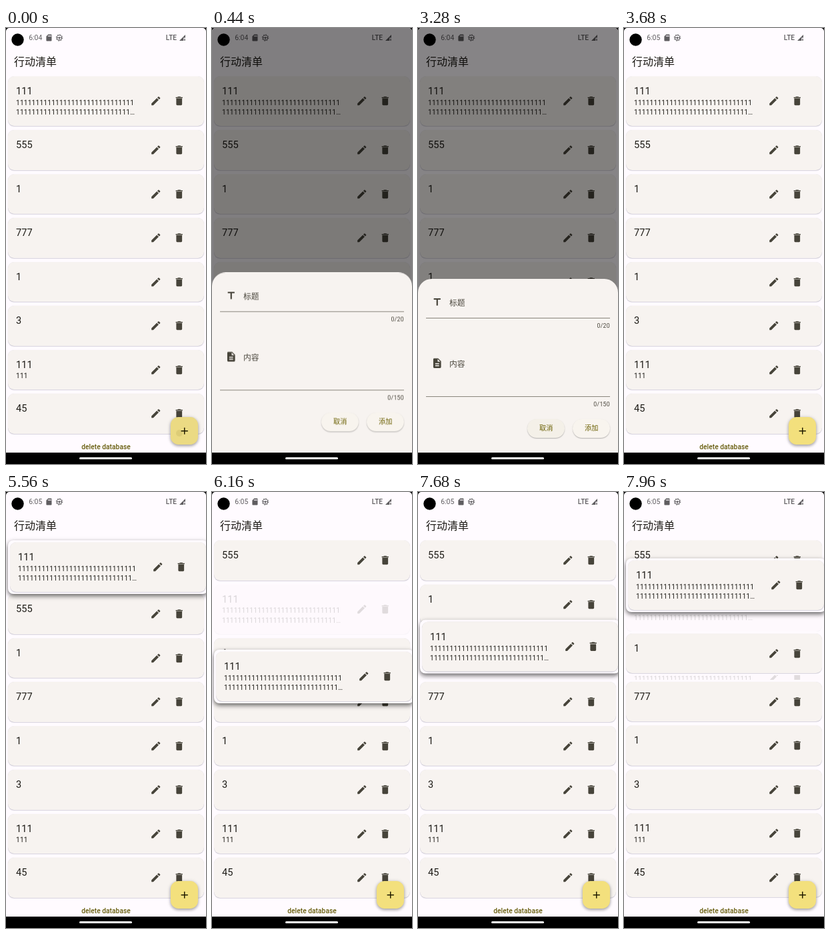
These frames come from a looping animation (300 by 650 pixels, 8 s). An HTML page:

```html
<!DOCTYPE html>
<html lang="zh-CN">
<head>
<meta charset="utf-8">
<title>Action list</title>
<style>
  html, body { margin: 0; width: 100%; height: 100%; overflow: hidden; background: #000; }
  #stage { position: absolute; left: 0; top: 0; width: 300px; height: 650px; overflow: hidden; background: #000;
    font-family: Roboto, "Noto Sans CJK SC", "Noto Sans CJK", sans-serif; color: #1d1b16; }
  #app { position: absolute; left: 0; top: 0; width: 300px; height: 633px; overflow: hidden; background: #fffbff;
    border-radius: 5px 5px 0 0; }
  #app *, #pill { position: absolute; box-sizing: border-box; white-space: nowrap; }
  svg { overflow: visible; }
  #status { left: 0; top: 0; width: 300px; height: 30px; }
  #status text { font-size: 10.4px; fill: #5f5d60; }
  h1 { margin: 0; left: 12px; top: 37px; font: 400 16px/24px "Noto Sans CJK SC", "Noto Sans CJK", sans-serif; }

  /* list */
  #app #list { left: 0; top: 69px; width: 300px; }
  #app .row, #app .gap { position: relative; width: 300px; }
  .row { height: 65.5px; flex: none; }
  .row.tall { height: 80px; }
  .gap { height: 0; overflow: hidden; display: flex; flex-direction: column; justify-content: center; }
  .card { left: 3px; right: 2.7px; top: 3px; bottom: 3px; border-radius: 9px; background: #f7f3f0;
    box-shadow: 0 .8px 1px rgba(40,40,80,.24), 0 0 1px rgba(0,0,0,.1); }
  .name { left: 12px; top: 12px; font-size: 14.6px; line-height: 20px; }
  .note { left: 12px; top: 32.7px; font-size: 10.2px; line-height: 14.6px; letter-spacing: .18px; }
  .icon { width: 17.5px; height: 17.5px; fill: #47443a; }
  .card .icon { top: calc(50% - 8.75px); }
  .edit { left: 212.6px; }
  .bin { left: 247.6px; }
  #app #drag { position: absolute; left: 0; top: 69px; border-radius: 8px; background: #fffbff; opacity: 0;
    box-shadow: 0 3px 7px rgba(0,0,0,.6); }

  #footer { left: 0; width: 300px; top: 617.3px; text-align: center; font: 500 10.2px/16px Roboto, sans-serif;
    letter-spacing: .05px; color: #665c0b; }
  #fab { left: 247.2px; top: 580px; width: 41px; height: 41px; border-radius: 11.7px; background: #f3e07d;
    box-shadow: 0 2px 4px rgba(0,0,0,.3), 0 1px 6px rgba(0,0,0,.14); }
  #fab .clip { inset: 0; border-radius: inherit; overflow: hidden; background: rgba(190,185,165,.16); }
  .ripple { width: 80px; height: 80px; margin: -40px; border-radius: 50%; background: rgba(100,90,10,.1); }
  #fab .ripple { left: 13px; top: 24px; }
  #fab .icon { left: 11.75px; top: 11.75px; fill: #211c00; }

  /* bottom sheet */
  #scrim { inset: 0; background: #000; opacity: 0; }
  #sheet { left: 0; top: 345px; width: 300px; height: 288px; border-radius: 20.4px 20.4px 0 0; background: #f7f3f0;
    transform: translateY(100%); }
  #sheet .icon { left: 20.3px; }
  .label { left: 47px; font-size: 11.8px; line-height: 18px; color: #4a463c; }
  .line { left: 12px; width: 276px; height: 1px; background: #8a867d; }
  .count { right: 12px; font-size: 8.76px; line-height: 12px; letter-spacing: .28px; color: #4a463c; }
  .button { top: 208.5px; width: 56px; height: 28.5px; border-radius: 15px; overflow: hidden; background: #f8f4ee;
    box-shadow: 0 1px 1.5px rgba(0,0,0,.27); text-align: center; font-size: 10.2px; line-height: 28.5px; color: #6a5f00; }
  #pill { left: 110px; top: 639.5px; width: 79px; height: 3px; border-radius: 2px; background: #fff; }

  /* one 8 s loop: 1% = 80 ms */
  #fab .clip, .ripple, #scrim, #sheet, .gap, #drag, .clock { animation: 8s linear infinite; }
  #fab .clip { animation-name: press; }
  #fab .ripple { animation-name: tap; }
  #cancel .ripple { left: 28px; top: 15px; animation-name: cancel; }
  #scrim { animation-name: dim; }
  #sheet { animation-name: slide; }
  #before { animation-name: before; }
  #after { animation-name: after; }
  #gap0 { animation-name: gap0; }
  #gap1 { animation-name: gap1; }
  #gap2 { animation-name: gap2; }
  #gap3 { animation-name: gap3; }
  .gap .row { opacity: .17; }
  #gap0 .row { animation: held 8s linear infinite; }
  #drag { animation-name: drag, lift; }

  @keyframes press { 0%, 2% { opacity: 1; } 5%, 100% { opacity: 0; } }
  @keyframes tap { 0% { transform: scale(.12); opacity: 1; } 2.5% { transform: scale(.85); opacity: 1; }
    5%, 100% { transform: scale(1); opacity: 0; } }
  @keyframes cancel { 0%, 37.4% { transform: scale(.1); opacity: 0; } 37.5% { transform: scale(.15); opacity: 1; }
    39.5% { transform: scale(.9); opacity: 1; } 41.5%, 100% { transform: scale(1); opacity: 0; } }
  @keyframes dim {
    0%, 3.4375% { opacity: 0; animation-timing-function: ease; }
    6.5625% { opacity: .54; }
    40% { opacity: .54; animation-timing-function: cubic-bezier(.75,0,.75,.9); }
    42.5%, 100% { opacity: 0; }
  }
  @keyframes slide {
    0%, 3.4375% { transform: translateY(100%); animation-timing-function: cubic-bezier(0,0,.2,1); }
    6.5625% { transform: none; }
    40% { transform: none; animation-timing-function: cubic-bezier(.8,0,1,1); }
    42.5%, 100% { transform: translateY(100%); }
  }
  @keyframes before { 0%, 44.44% { opacity: 1; } 44.45%, 100% { opacity: 0; } }
  @keyframes after { 0%, 44.44% { opacity: 0; } 44.45%, 100% { opacity: 1; } }
  @keyframes held {
    0%, 65.3% { opacity: 1; background: rgba(0,0,0,0); }
    66.5%, 69.44% { opacity: 1; background: rgba(0,0,0,.025); }
    69.45%, 100% { opacity: .17; background: rgba(0,0,0,0); }
  }
  @keyframes gap0 { 0%, 73.75% { height: 80px; } 75.625%, 100% { height: 0; } }
  @keyframes gap1 { 0%, 73.75% { height: 0; } 75.625%, 77.75% { height: 80px; }
    79.125%, 97.8% { height: 0; } 99.675%, 100% { height: 80px; } }
  @keyframes gap2 { 0%, 77.75% { height: 0; } 79.125% { height: 80px; } 80.5%, 93.75% { height: 0; }
    95.625%, 97.8% { height: 80px; } 99.675%, 100% { height: 0; } }
  @keyframes gap3 { 0%, 79.125% { height: 0; } 80.5%, 93.75% { height: 80px; } 95.625%, 100% { height: 0; } }
  @keyframes lift { 0%, 69.44% { opacity: 0; } 69.45%, 100% { opacity: 1; } }
  @keyframes drag {
    0%, 72.2% { transform: translate(3px, 3px); }
    73.75% { transform: translate(3px, 40px); }
    75.5% { transform: translate(3px, 112px); }
    77%, 77.8% { transform: translate(3px, 166px); }
    78.75% { transform: translate(3px, 200px); }
    80.5%, 92.1% { transform: translate(3px, 216px); }
    93.25% { transform: translate(3px, 199px); }
    95% { transform: translate(3px, 153px); }
    97% { transform: translate(3px, 91px); }
    98.5% { transform: translate(3px, 48px); }
    99.5%, 100% { transform: translate(3px, 30px); }
  }
</style>
</head>
<body>
<svg width="0" height="0" style="position:absolute">
  <symbol id="i-edit" viewBox="0 0 24 24"><path d="M3 17.25V21h3.75L17.81 9.94l-3.75-3.75zM20.71 7.04a1 1 0 0 0 0-1.41l-2.34-2.34a1 1 0 0 0-1.41 0l-1.83 1.83 3.75 3.75z"/></symbol>
  <symbol id="i-bin" viewBox="0 0 24 24"><path d="M6 19a2 2 0 0 0 2 2h8a2 2 0 0 0 2-2V7H6zM19 4h-3.5l-1-1h-5l-1 1H5v2h14z"/></symbol>
  <symbol id="i-add" viewBox="0 0 24 24"><path d="M19 13h-6v6h-2v-6H5v-2h6V5h2v6h6z"/></symbol>
  <symbol id="i-title" viewBox="0 0 24 24"><path d="M5 4v3h5.5v12h3V7H19V4z"/></symbol>
  <symbol id="i-doc" viewBox="0 0 24 24"><path d="M14 2H6a2 2 0 0 0-2 2v16a2 2 0 0 0 2 2h12a2 2 0 0 0 2-2V8zm2 16H8v-2h8zm0-4H8v-2h8zm-3-5V3.5L18.5 9z"/></symbol>
</svg>
<div id="stage">
  <div id="app">
    <svg id="status" viewBox="0 0 300 30">
      <circle cx="17.5" cy="17.5" r="9.2"/>
      <text id="before" class="clock" x="34.2" y="18.2">6:04</text>
      <text id="after" class="clock" x="34.2" y="18.2">6:05</text>
      <path fill="#5f5d60" fill-rule="evenodd" d="M63.3 9.6H67.5Q68.5 9.6 68.5 10.6V18.4Q68.5 19.4 67.5 19.4H61.4Q60.4 19.4 60.4 18.4V12.5ZM63.2 11v2h1v-2zm1.7 0v2h1v-2zm1.7 0v2h1v-2z"/>
      <g fill="none" stroke="#5f5d60">
        <circle cx="80" cy="14.5" r="3.7" stroke-width="1.1"/>
        <circle cx="80" cy="14.5" r="4.8" stroke-width="1" stroke-dasharray="1.5 2.27"/>
        <path d="M76.5 14.5h7M80 14.5v3.5" stroke-width=".9"/>
      </g>
      <circle cx="80" cy="14.5" r="1.3" fill="#5f5d60"/>
      <text x="239.7" y="18.2" style="font-size:10.2px;font-weight:500">LTE</text>
      <path fill="#5f5d60" d="M260 19L269 10V14.6H266.3V19ZM267.4 16h1.3v3h-1.3z"/>
    </svg>
    <h1>行动清单</h1>
    <div id="list"></div>
    <div id="footer">delete database</div>
    <div id="fab"><div class="clip"><div class="ripple"></div></div><svg class="icon"><use href="#i-add"/></svg></div>
    <div id="drag" class="row tall"></div>
    <div id="scrim"></div>
    <div id="sheet">
      <svg class="icon" style="top:26.3px"><use href="#i-title"/></svg>
      <div class="label" style="top:26.7px">标题</div>
      <div class="line" style="top:58px"></div>
      <div class="count" style="top:63.8px">0/20</div>
      <svg class="icon" style="top:117px"><use href="#i-doc"/></svg>
      <div class="label" style="top:117.5px">内容</div>
      <div class="line" style="top:175px"></div>
      <div class="count" style="top:180.5px">0/150</div>
      <div id="cancel" class="button" style="left:164.3px"><div class="ripple"></div>取消</div>
      <div class="button" style="left:232.3px">添加</div>
    </div>
  </div>
  <div id="pill"></div>
</div>
<script>
  const icon = (cls) => `<svg class="icon ${cls}"><use href="#i-${cls}"/></svg>`;
  const card = (name, note = '') =>
    `<div class="card"><div class="name">${name}</div><div class="note">${note}</div>${icon('edit')}${icon('bin')}</div>`;
  const row = (name, note) => `<div class="row">${card(name, note)}</div>`;

  const longCard = card('111', '1'.repeat(30) + '<br>' + '1'.repeat(29) + '…');
  const gap = (i) => `<div class="gap" id="gap${i}"><div class="row tall">${longCard}</div></div>`;
  const items = [['555'], ['1'], ['777'], ['1'], ['3'], ['111', '111'], ['45']];

  // The long card can sit before any of the first four rows.
  document.getElementById('list').innerHTML =
    items.map((item, i) => (i < 4 ? gap(i) : '') + row(...item)).join('');
  document.getElementById('drag').innerHTML = longCard;
</script>
</body>
</html>
```
